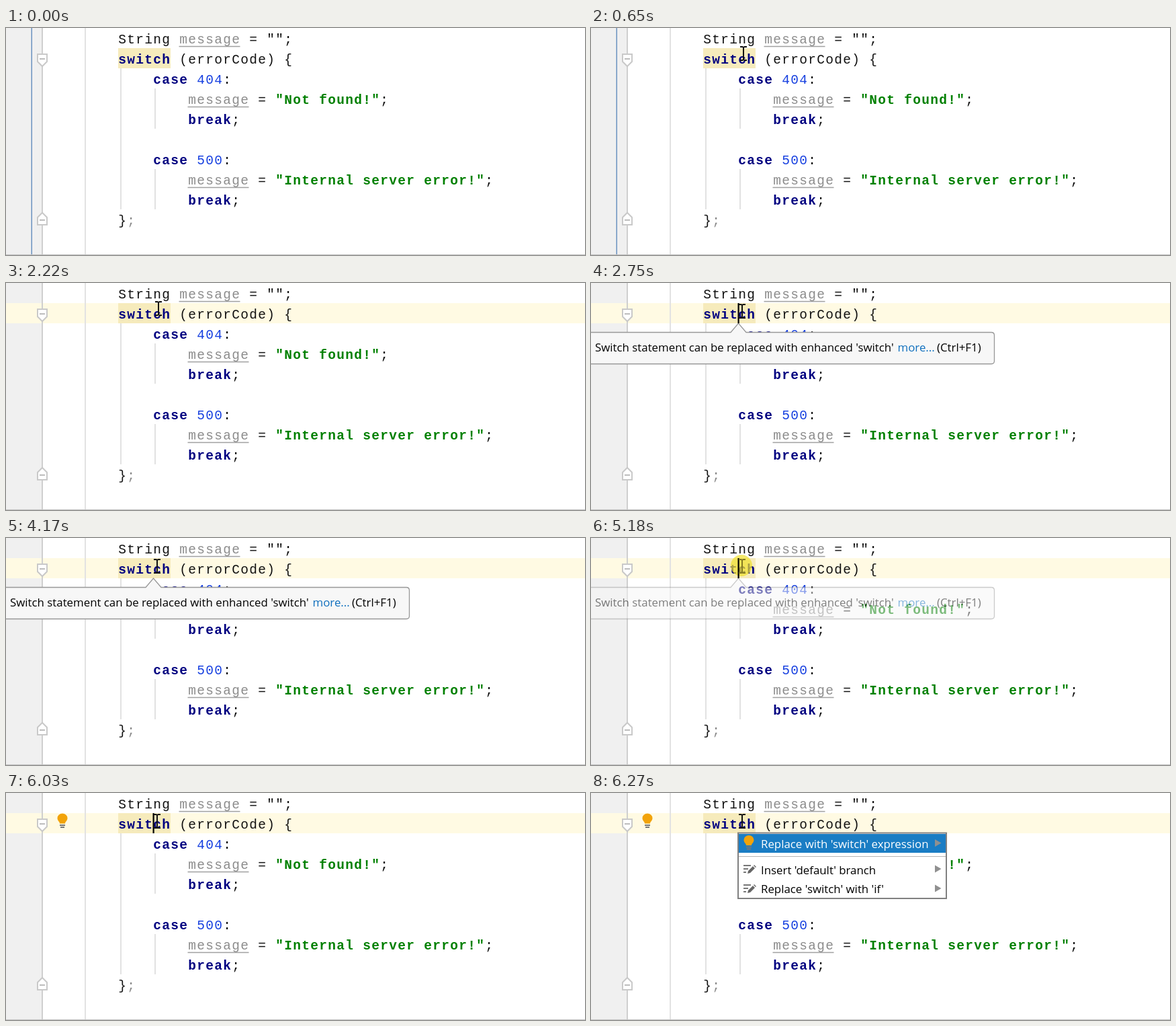
An HTML page that plays this animation: 862 by 338 pixels, repeating every 8000 ms.

```html
<!DOCTYPE html>
<html lang="en">
<head>
<meta charset="utf-8">
<title>Switch inspection</title>
<style>
html, body { margin: 0; width: 100%; height: 100%; overflow: hidden; background: #fff; }
svg { display: block; width: 862px; height: 338px; }
.code { font: 19.5px "Liberation Mono", "Courier New", monospace; letter-spacing: 1.3px; fill: #111; }
.ui { font: 16.85px "Open Sans", "Noto Sans", sans-serif; fill: #000; }
.k { fill: #000080; font-weight: bold; }
.s { fill: #008000; font-weight: bold; }
.n { fill: #1740e0; }
.g { fill: #8c8c8c; }
.guide { stroke: #e2e2e2; stroke-width: 2; }
.fold { fill: #fff; stroke: #c9c9c9; stroke-width: 2; }
</style>
</head>
<body>
<svg viewBox="0 0 862 338">
  <defs>
    <g id="bulb">
      <path d="M-4 6 C-4 3 -7.5 2 -7.5 -2 A7.5 7 0 0 1 7.5 -2 C7.5 2 4 3 4 6 Z" fill="#f2a30a"/>
      <path d="M-4 8.5 H4 M-3 11.5 H3" stroke="#777" stroke-width="2"/>
    </g>
    <g id="edit">
      <path d="M0 2 H11 M0 7 H7 M0 12 H4" stroke="#777" stroke-width="2"/>
      <path d="M6 14 L7 10 L14 3 L17 6 L10 13 Z M15 2 L16 1 L19 4 L18 5 Z" fill="#666"/>
    </g>
    <path id="arrow" d="M512 -5.5 L521.5 0 L512 5.5 Z"/>
  </defs>

  <rect width="53" height="338" fill="#f0f0f0"/>
  <rect id="row" y="30" width="862" height="30" fill="#fffae3"/>
  <rect id="edge" x="37.5" width="1.5" height="338" fill="#6a92bf"/>
  <path d="M54 0 V338" stroke="#cfcfcf" stroke-width="2"/>
  <path class="guide" d="M118 0 V338 M171 60 V270 M222 90 V150 M222 210 V270"/>
  <path class="fold" d="M47 39 H61 V50 L54 57 L47 50 Z M47 293 H61 V282 L54 275 L47 282 Z"/>
  <path d="M50 46 H58 M50 286 H58" stroke="#bdbdbd" stroke-width="2"/>
  <rect x="167" y="30" width="78" height="30" fill="#f6ebbc"/>
  <g class="code" id="code"></g>
  <path d="M0 337.5 H862" stroke="#c4c4c4"/>

  <g id="tip">
    <path d="M-3 73.5 H208 L219.5 60 L231 73.5 H596 Q600.5 73.5 600.5 78 V116 Q600.5 120.5 596 120.5 H-3 Z" fill="#f7f7f7" stroke="#989898" stroke-width="1.3"/>
    <g class="ui">
      <text x="6" y="102">Switch statement can be replaced with enhanced 'switch'</text>
      <text x="456.5" y="102" style="fill:#0f6fbe">more...</text>
      <text x="515" y="102">(Ctrl+F1)</text>
    </g>
  </g>

  <use id="hint" href="#bulb" x="84" y="39.5"/>

  <g id="menu">
    <rect x="219" y="59.5" width="310" height="97.5" fill="#fff" stroke="#808080" stroke-width="2"/>
    <rect x="220" y="61" width="308" height="28" fill="#1a7dc4"/>
    <path d="M220 94.5 H528" stroke="#b4b4b4"/>
    <use href="#bulb" x="235" y="72"/>
    <use href="#edit" x="227" y="106"/>
    <use href="#edit" x="227" y="135"/>
    <g class="ui">
      <text x="253" y="82" style="fill:#fff">Replace with 'switch' expression</text>
      <text x="253" y="121">Insert 'default' branch</text>
      <text x="253" y="149">Replace 'switch' with 'if'</text>
    </g>
    <g fill="#909090">
      <use href="#arrow" y="74.5"/>
      <use href="#arrow" y="113"/>
      <use href="#arrow" y="142"/>
    </g>
  </g>

  <circle id="click" r="16" fill="#f0e02c" fill-opacity=".7"/>
  <rect id="caret" x="218.5" y="30" width="2.2" height="30"/>
  <path id="beam" d="M-5 -10 H-1.5 L0 -9 L1.5 -10 H5 M0 -9 V9 M-5 10 H-1.5 L0 9 L1.5 10 H5" fill="none" stroke-width="2"/>
</svg>
<script>
const $ = id => document.getElementById(id);
const LEFT = 167.3, CHAR = 13, LINE = 30;

// Each line: row, indent in characters, then [class, text] runs.
const LINES = [
  [0, 0, ['', 'String '], ['g', 'message'], ['', ' = '], ['', '"";']],
  [1, 0, ['k', 'switch'], ['', ' (errorCode) {']],
  [2, 4, ['k', 'case '], ['n', '404'], ['', ':']],
  [3, 8, ['g', 'message'], ['', ' = '], ['s', '"Not found!"'], ['', ';']],
  [4, 8, ['k', 'break'], ['', ';']],
  [6, 4, ['k', 'case '], ['n', '500'], ['', ':']],
  [7, 8, ['g', 'message'], ['', ' = '], ['s', '"Internal server error!"'], ['', ';']],
  [8, 8, ['k', 'break'], ['', ';']],
  [9, 0, ['', '}'], ['g', ';']]
];

$('code').innerHTML = LINES.map(([row, indent, ...runs]) => {
  let col = indent;
  return runs.map(([cls, text]) => {
    const x = LEFT + col * CHAR, y = 23 + row * LINE;
    col += text.length;
    const line = text === 'message'
      ? `<path d="M${x - .8} ${y + 4.5} h${7 * CHAR}" stroke="#a0a0a0" stroke-width="1.3"/>` : '';
    return `<text class="${cls}" x="${x}" y="${y}" style="white-space:pre">${text}</text>${line}`;
  }).join('');
}).join('');

// Changes to the scene, in ms; each step keeps everything it does not name.
const STEPS = [
  [0, { beam: null, click: 0, row: 0, edge: 1, caret: 0, tip: 0, hint: 0, menu: 0 }],
  [500, { beam: [228, 38] }],
  [650, { beam: [227, 38] }],
  [1200, { click: 1, row: 1, edge: 0, caret: 1 }],
  [1270, { click: 0 }],
  [2220, { caret: 0 }],
  [2600, { beam: [225, 42], tip: .35 }],
  [2680, { tip: .7 }],
  [2750, { tip: 1, caret: 1 }],
  [3150, { caret: 0 }],
  [3700, { caret: 1 }],
  [4170, { caret: 0 }],
  [4720, { caret: 1 }],
  [5180, { tip: .5, click: 1 }],
  [5260, { tip: 0 }],
  [5330, { click: 0 }],
  [6030, { hint: 1 }],
  [6270, { menu: 1, caret: 0 }]
];
const LOOP = 8000;

function draw(now) {
  const time = now % LOOP;
  const scene = Object.assign({}, ...STEPS.filter(([at]) => at <= time).map(step => step[1]));
  for (const id of ['click', 'row', 'edge', 'caret', 'tip', 'hint', 'menu'])
    $(id).setAttribute('opacity', scene[id]);
  const [x, y] = scene.beam || [-50, -50];
  $('beam').setAttribute('transform', `translate(${x} ${y})`);
  $('beam').setAttribute('stroke', scene.click ? '#857b22' : '#111');
  $('click').setAttribute('transform', `translate(${x - 1} ${y - 1})`);
}

const start = performance.now();
function tick() {
  draw(performance.now() - start);
  requestAnimationFrame(tick);
}
tick();
</script>
</body>
</html>
```
